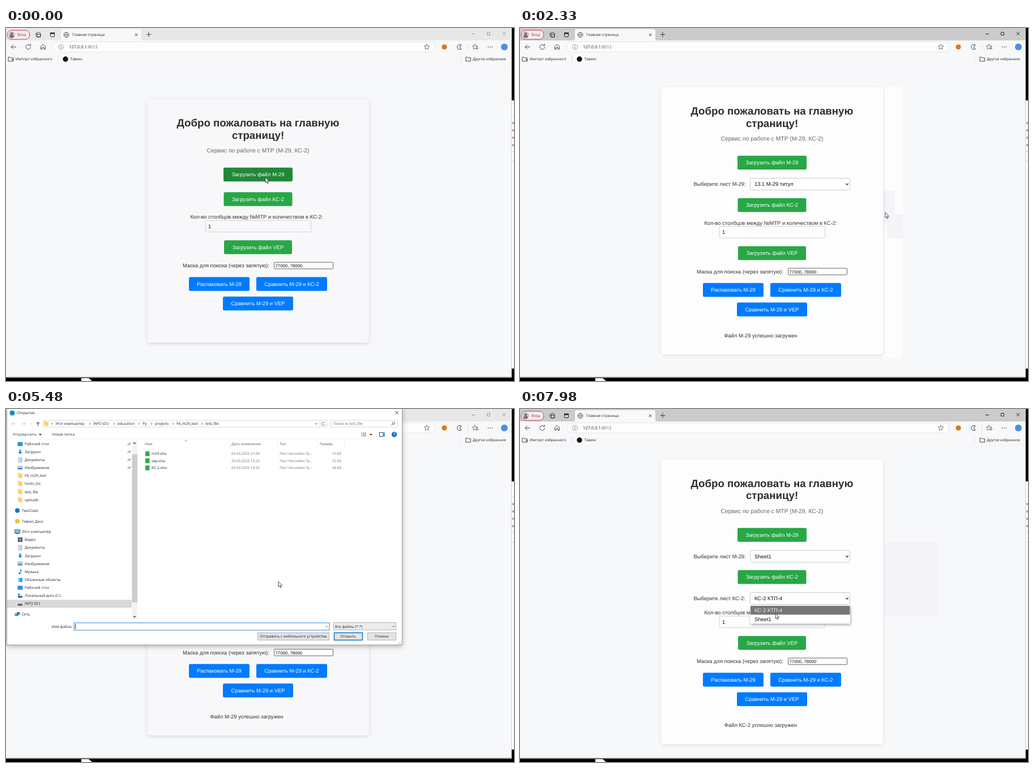
An HTML page for the animation above (8 s loop, 897 by 624 pixels).

```html
<!DOCTYPE html>
<html lang="ru">
<head>
<meta charset="utf-8">
<title>Главная страница</title>
<style>
html, body { margin: 0; width: 100%; height: 100%; overflow: hidden; background: #000; }
svg { display: block; width: 897px; height: 624px; text-rendering: geometricPrecision; font-family: "Open Sans", "Noto Sans", sans-serif; }
.web { font-family: "Liberation Sans", Arial, sans-serif; }
.lift { filter: drop-shadow(0 2px 5px rgba(0,0,0,.3)); }
.soft { filter: drop-shadow(0 2px 3px rgba(0,0,0,.13)); }
.drop { filter: drop-shadow(1px 2px 2px rgba(0,0,0,.35)); }
</style>
</head>
<body>
<svg id="stage" viewBox="0 0 897 624"></svg>
<script>
const LOOP = 8000;
const stage = document.getElementById('stage');

// --- drawing helpers -----------------------------------------------------
const text = (x, y, s, size = 6.6, fill = '#222', extra = '') =>
  `<text x="${x}" y="${y + size * .36}" font-size="${size}" fill="${fill}" ${extra}>${s}</text>`;
const rect = (x, y, w, h, fill, extra = '') =>
  `<rect x="${x}" y="${y}" width="${w}" height="${h}" fill="${fill}" ${extra}/>`;
const frame = (x, y, w, h, fill, stroke, r = 0, sw = 1) =>
  rect(x + .5, y + .5, w - 1, h - 1, fill, `stroke="${stroke}" stroke-width="${sw}" rx="${r}"`);
const dot = (x, y, r, fill, extra = '') => `<circle cx="${x}" cy="${y}" r="${r}" fill="${fill}" ${extra}/>`;
const line = (d, stroke = '#333', w = .9, fill = 'none') =>
  `<path d="${d}" stroke="${stroke}" stroke-width="${w}" fill="${fill}"/>`;
const chevron = (x, y, c = '#444', k = 2, w = .9) => line(`M${x - k} ${y - k / 2}l${k} ${k}l${k} ${-k}`, c, w);
const cross = (x, y, k, c) => line(`M${x - k} ${y - k}l${2 * k} ${2 * k}M${x + k} ${y - k}l${-2 * k} ${2 * k}`, c);
const folder = (x, y, c = '#f8d568') => rect(x - 3.5, y - 4, 4, 3, '#e3b341') + rect(x - 3.5, y - 3, 7.5, 7, c);
const folderLine = (x, y) => line(`M${x - 4} ${y - 3.5}h3l1 1.2h4.5v6h-8.5z`);
const star = (x, y) => {
  let d = '';
  for (let i = 0; i < 10; i++) {
    const r = i % 2 ? 2.2 : 5, a = i * Math.PI / 5;
    d += (i ? 'L' : 'M') + (x + r * Math.sin(a)).toFixed(2) + ' ' + (y - r * Math.cos(a)).toFixed(2);
  }
  return line(d + 'z', '#555', .8);
};
const middle = 'text-anchor="middle"';

// --- browser window ------------------------------------------------------
function desktop() {
  return rect(0, 0, 897, 624, '#000') + rect(893, 128, 4, 474, '#fafafa') +
    rect(893, 218, 4, 1, '#ccc') + rect(893, 235, 4, 1, '#ccc') + rect(893, 155, 4, 1, '#e2e2e2') +
    [168, 181, 194, 207].map(y => rect(894, y - 2, 3, 4, y === 194 ? '#d99' : '#aaa')).join('') +
    '<path d="M133 619h13l6 5h-19z" fill="#fff"/>';
}

function browser(active) {
  const ctl = active ? '#111' : '#8d8d8d';
  return rect(0, 0, 893, 618, '#f7f8fa') + rect(0, 616, 893, 1, '#dcdcdc') + rect(0, 617, 893, 1.5, '#8a8a8a') +
    rect(892, 0, 1, 617, '#d4d4d6') +
    rect(0, 0, 893, 22, active ? '#cbcbcb' : '#e8e8e8') +
    '<path d="M94 22q3 0 3-3V6q0-4 4-4h134q4 0 4 4v13q0 3 3 3z" fill="#f7f8fa"/>' +
    frame(1.5, 3.5, 41, 17, '#f6eced', '#c2414a', 8) +
    dot(10, 12, 6, '#c9c5c4') + dot(10, 10, 2.3, '#77706e') + '<path d="M6 16q0-4 4-4t4 4q-4 3-8 0z" fill="#77706e"/>' +
    text(20, 12, 'Вход', 6.6, '#b02a34') +
    line('M53 9.5l4-2.2l4 2.2v4.5l-4 2.5l-4-2.5zM55 11h6v5h-6zM53 9.5l3.5 2') +
    frame(78, 8, 8, 8, 'none', '#222', 1) + rect(78, 8, 8, 2.5, '#222') +
    dot(106.5, 12, 4.5, 'none', 'stroke="#444" stroke-width=".8"') +
    line('M102 12h9M106.5 7.5q-4 4.5 0 9q4-4.5 0-9', '#444', .7) +
    text(117, 12, 'Главная страница', 6.55) + cross(230, 12, 2.3, '#333') +
    line('M247.500 11.500h9M252 7v9', '#333') +
    line('M822 10.500h6', ctl) + frame(849, 7, 6, 6, 'none', ctl, .5, .9) + cross(879.5, 10, 2.8, ctl) +
    line('M18 33.500h-9M13 29.500l-4 4l4 4') +
    line('M43.500 33.500a4.200 4.200 0 1 1-1.500-3.200M43.500 28v3h-3') +
    line('M61.500 37.500v-5l4-3.500l4 3.500v5h-2.500v-3h-3v3z') +
    frame(82, 24, 676, 19, '#fdfdfe', '#e4e5e8', 9) +
    dot(97, 33.5, 4.3, 'none', 'stroke="#666" stroke-width=".7"') + line('M97 33v3M97 31v1', '#555') +
    text(111, 33.5, '127.0.0.1<tspan fill="#666">:8012</tspan>', 7.5) + star(743, 33.5) +
    dot(774, 33.5, 4.6, '#e2761b') +
    line('M799 29.500h4.500v2.200q-2.400.3-2.400 2t2.400 2v2h-4.500l-2-2v-4z', '#333') +
    rect(815, 28, .8, 11, '#ddd') + star(828, 33.5) + line('M831 34h3M831 36.500h3', '#444') +
    [851.5, 855, 858.5].map(x => dot(x, 33.5, .8, '#222')).join('') +
    dot(880, 33.5, 6, '#4b8fe0') +
    folderLine(8, 55) + line('M9 56h4M11.500 54l2 2l-2 2', '#333', .8) + text(17, 55, 'Импорт избранного') + rect(91, 49, .8, 11, '#ddd') +
    dot(105, 55, 4.7, '#111') + text(113.5, 55, 'Тавикс') +
    rect(802.5, 49, .8, 11, '#ddd') + folderLine(816, 55) + text(824, 55, 'Другое избранное') +
    rect(0, 65, 892, .7, '#eeeff1');
}

// --- web page ------------------------------------------------------------
const LAYOUT = [ // shift of the top block, of the second button, of the lower block
  [0, 0, 0], [-21, 10.5, 10.5], [-36.5, -5.5, 26]
];
const button = (x, y, w, label, fill) =>
  rect(x, y - 12.25, w, 24.5, fill, 'rx="2.5"') + text(x + w / 2, y, label, 9.4, '#fff', middle);
const select = (y, form, value) =>
  text(306.5, y, `Выберите лист ${form}:`, 9.4, '#333') +
  frame(406, y - 11, 177, 22, '#fdfdfe', '#c9cbce', 2) +
  text(414, y, value, 9.4, '#111') + chevron(577.5, y, '#222', 2.2, 1.3);

function page(s) {
  const [a, b, c] = LAYOUT[s.page], top = 126 + a, tint = s.white ? '#fdfdfe' : '#f8f8fa';
  const green = name => s.hot === name ? '#218838' : '#28a745';
  let out = '';
  if (s.white) out += s.page === 1
    ? rect(247, 104, 429, 478, tint) + rect(642, 288, 20, 57, '#f4f4f8') + rect(648, 329, 28, 43, '#f4f4f8')
    : rect(642, 235, 98, 130, '#f4f4f8') + rect(247, 88, 396, 510, tint);
  out += rect(249.5, top, 391.5, 430 - 2 * a, tint, 'rx="5" class="soft"');
  out += text(445, 167.5 + a, 'Добро пожаловать на главную', 18.7, '#2e2e2e', middle + ' font-weight="700"') +
    text(445, 189 + a, 'страницу!', 18.7, '#2e2e2e', middle + ' font-weight="700"') +
    text(445, 216.5 + a, 'Сервис по работе с МТР (М-29, КС-2)', 10.4, '#666', middle) +
    button(384, 259 + a, 122, 'Загрузить файл М-29', green('m')) +
    button(384.5, 302.5 + b, 121, 'Загрузить файл КС-2', green('k'));
  if (s.page > 0) out += select(297 + a, 'М-29', s.sheet);
  if (s.page > 1) out += select(335, 'КС-2', 'КС-2 КТП-4');
  out += text(442.5, 334 + c, 'Кол-во столбцов между №МТР и количеством в КС-2:', 9.4, '#333', middle) +
    frame(351.5, 339.5 + c, 187.5, 21.5, tint, '#cfd1d4', 2) + text(357, 350.5 + c, '1', 9.4, '#111') +
    button(385, 387.5 + c, 120, 'Загрузить файл VEP', '#28a745') +
    text(312, 420 + c, 'Маска для поиска (через запятую):', 9.4, '#333') +
    frame(473, 413.7 + c, 105, 12.6, '#fdfdfe', '#666', 1) + text(475.5, 420.2 + c, '77000, 78000', 7.8, '#111') +
    button(323, 452.5 + c, 107, 'Распаковать М-29', '#007bff') +
    button(442, 452.5 + c, 125, 'Сравнить М-29 и КС-2', '#007bff') +
    button(383, 487 + c, 124, 'Сравнить М-29 и VEP', '#007bff');
  if (s.page) out += text(425, 532.7 + c, `Файл ${s.page > 1 ? 'КС-2' : 'М-29'} успешно загружен`, 9.4, '#333', middle);
  if (s.menu) out += menu(s);
  return `<g class="web">${out}</g>`;
}

function menu(s) {
  const y = s.page > 1 ? 347.5 : 289;
  const items = [s.page > 1 ? 'КС-2 КТП-4' : '13.1 М-29 титул', 'Sheet1'];
  return rect(406.5, y, 176.5, 32, '#fff', 'class="drop"') + items.map((label, i) => {
    const on = i === s.menu - 1;
    return (on ? rect(407, y + .5 + i * 15.5, 175.500, 15.5, '#767676') : '') +
      text(414, y + 8.2 + i * 15.5, label, 9.4, on ? '#f2f2f2' : '#111');
  }).join('');
}

// --- file dialog ---------------------------------------------------------
const BLUE = '#2f8fd8';
const ICON = {
  desk: (x, y) => rect(x - 4.5, y - 3.5, 9, 7, BLUE),
  down: (x, y) => `<path d="M${x - 1.5} ${y - 4}h3v4h2.500l-4 4l-4-4h2.500z" fill="${BLUE}"/>`,
  doc: (x, y) => frame(x - 3.5, y - 4.5, 7, 9, '#fff', '#8a9aaa', 0, .8) + line(`M${x - 1.5} ${y - 2}h4M${x - 1.5} ${y}h4M${x - 1.5} ${y + 2}h4`, BLUE, .7),
  pic: (x, y) => frame(x - 4.5, y - 3.5, 9, 7, '#cfe6f7', '#7c93a5', 0, .8) + rect(x - 3, y, 6, 2, '#33719f'),
  dir: (x, y) => folder(x, y),
  cloud: (x, y) => dot(x, y, 4, '#1273c9'),
  disk: (x, y) => dot(x, y, 4, '#f2c230'),
  pc: (x, y) => frame(x - 5, y - 4, 10, 7, '#7cc3f0', '#3578a5') + rect(x - 3, y + 3, 6, 1, '#3578a5'),
  film: (x, y) => rect(x - 4, y - 4, 8, 8, '#444b57') + rect(x - 2.2, y - 3, 4.4, 6, '#6f8fc0'),
  note: (x, y) => dot(x - 1, y + 2.5, 1.8, BLUE) + line(`M${x + .5} ${y + 2.5}v-7q0 2 3 3`, BLUE, 1.2),
  cube: (x, y) => rect(x - 4, y - 3.5, 8, 7.500, '#35a6d8') + rect(x - 4, y - 3.5, 3, 7.5, '#8ad6f2'),
  drive: (x, y) => rect(x - 4, y + .5, 8, 3, '#4a4f55') + rect(x + 2, y + 1.5, 1, 1, '#6d6'),
  win: (x, y) => ICON.drive(x, y) + rect(x - 4, y - 3.5, 4, 3, BLUE),
  net: (x, y) => rect(x - 4.5, y - 1.5, 6, 4.5, '#4e93bd') + rect(x - 1, y - 4, 5.5, 5, '#3a7fae')
};
const TREE = [ // centre line, icon, label
  [62, 'desk', 'Рабочий стол'], [76, 'down', 'Загрузки'], [90, 'doc', 'Документы'], [104, 'pic', 'Изображения'],
  [118, 'dir', 'FA_m29_test'], [132, 'dir', 'hosts_list'], [146.3, 'dir', 'test_file'], [160.5, 'dir', 'uploads'],
  [179.5, 'cloud', 'TwoCrate', 1], [198.5, 'disk', 'Тавикс.Диск', 1], [217, 'pc', 'Этот компьютер', 1],
  [231, 'film', 'Видео'], [245, 'doc', 'Документы'], [259.5, 'down', 'Загрузки'], [273.5, 'pic', 'Изображения'],
  [288, 'note', 'Музыка'], [302, 'cube', 'Объемные объекты'], [316, 'desk', 'Рабочий стол'],
  [330, 'win', 'Локальный диск (C:)'], [344, 'drive', 'INFO (D:)'], [363, 'net', 'Сеть', 1]
];
const CRUMBS = [[87, 'Этот компьютер'], [154, 'INFO (D:)'], [197, 'education'], [241, 'Py'], [263, 'projects'], [301, 'FA_m29_test'], [352, 'test_file']];
const FILES = [
  ['m29.xlsx', '04.03.2025 21:08', '15 КБ'],
  ['vep.xlsx', '20.05.2023 13:23', '10 КБ'],
  ['КС-2.xlsx', '09.03.2025 14:32', '24 КБ']
];
const pin = y => line(`M214.500 ${y + 2.500}l2-2M215.500 ${y - 1.500}l3 3M216.500 ${y - .5}l2-2l1.500 1.500l-2 2`, '#777', 1);

function dialog(s) {
  let o = rect(1.5, -1, 698, 418, '#fff', 'class="lift" stroke="#8b8b8b" stroke-width=".8"');
  o += dot(11, 7, 4.5, '#1b87c9') + text(19, 7, 'Открытие') + cross(690, 6.5, 2.8, '#222');
  o += line('M17 26h-7M13 23l-3 3l3 3M27 26h7M31 23l3 3l-3 3', '#c4c4c4') + chevron(44, 26, '#bbb', 1.3) +
    line('M56.500 30v-7M53.500 26l3-3l3 3', '#333', 1);
  o += frame(65, 19.5, 502, 13, '#fff', '#d9d9d9') + folder(71, 26) + rect(554, 20, .8, 12, '#ddd');
  for (const [x, name] of CRUMBS) o += line(`M${x - 7} 24l2 2l-2 2`, '#555', .8) + text(x, 26, name, 6.5);
  o += chevron(548, 26) + line('M562.500 26.500a2.600 2.600 0 1 1-1-2.200v-1.500', '#444', .8);
  o += frame(573, 19.5, 119, 13, '#fff', '#d9d9d9') + text(578, 26, 'Поиск в: test_file', 6.5, '#666') +
    dot(684.5, 25, 2, 'none', 'stroke="#333" stroke-width=".8"') + line('M683 26.500l-2.500 2.500');
  o += text(12, 45, 'Упорядочить', 6.5, '#1e395b') + '<path d="M58 44h5l-2.500 3z" fill="#1e395b"/>' +
    text(81, 45, 'Новая папка', 6.5, '#1e395b') +
    line('M627 42.500h2M627 45h2M627 47.500h2M630 42.500h6M630 45h6M630 47.500h6', '#667', 1) +
    '<path d="M642 44h5l-2.500 3z" fill="#333"/>' +
    frame(659, 41, 10, 8, '#fff', '#345') + rect(665, 41, 4, 8, '#5aa0d8') +
    dot(685.5, 45, 4.7, '#0d72c4') + text(685.5, 45, '?', 6.6, '#fff', middle + ' font-weight="700"') +
    rect(2, 53.5, 697, .7, '#efefef');

  o += rect(2, 337.3, 220, 14, '#d9d9d9');
  for (const [y, icon, name, root] of TREE) o += ICON[icon](root ? 20 : 25, y) + text(root ? 28 : 33, y, name, 6.5);
  o += [62, 76, 90, 104].map(pin).join('');
  o += rect(222.5, 56, 9.5, 316, '#f3f3f3') + rect(222.5, 80, 9.5, 262, '#cdcdcd') +
    line('M225 61.500l2-2l2 2', '#333', 1.1) + chevron(227, 367, '#333', 2, 1.1);

  const heads = [[245, 'Имя'], [398, 'Дата изменения'], [483, 'Тип'], [554, 'Размер']];
  o += heads.map(([x, h]) => text(x, 62, h, 6.5, '#4c607a')).join('') +
    [394, 478.5, 549.5, 597].map(x => rect(x, 55, .7, 14, '#e5e5e5')).join('') + line('M316 57l2-1.700l2 1.700', '#666', .7);
  FILES.forEach(([name, date, size], i) => {
    const y = 79 + i * 12.5;
    if (s.pick === i || s.over === i) o += rect(243.5, y - 6.2, 350, 12.4, s.pick === i ? '#cce8ff' : '#e5f3ff');
    o += rect(246, y - 4.2, 7.5, 8.5, '#35a853') + text(257, y, name, 6.5) + text(398, y, date, 6.3, '#6d6d6d') +
      text(483, y, 'Лист Norvellon Ta...', 6.3, '#6d6d6d') + text(592, y, size, 6.3, '#6d6d6d', 'text-anchor="end"');
  });

  o += text(117, 384.3, 'Имя файла:', 6.5, '#222', 'text-anchor="end"') + frame(119.5, 377.5, 452, 14, '#fff', '#2b88d8') + chevron(566, 384.5) +
    (s.pick === undefined ? rect(122, 380, .9, 9, '#111') : text(123, 384.3, FILES[s.pick][0], 6.5)) +
    frame(578, 377, 111, 14, '#ececec', '#b4b4b4') + text(581, 384.3, 'Все файлы (*.*)', 6.5) + chevron(684, 384.5) +
    frame(444, 395, 127, 14, '#e3e3e3', '#b4b4b4') + text(507.5, 402, 'Отправить с мобильного устройства', 6.6, '#222', middle) +
    frame(579, 395, 51, 14, '#e3e3e3', '#0078d7', 0, 1.5) + text(604, 402, 'Открыть', 6.6, '#222', middle) +
    frame(638, 395, 51, 14, '#e3e3e3', '#b4b4b4') + text(663, 402, 'Отмена', 6.6, '#222', middle) +
    line('M692 416l6-6M695 416l3-3', '#aaa', .8);
  return `<g opacity="${s.fade}" transform="translate(350 208) scale(${s.zoom}) translate(-350 -208)">${o}</g>`;
}

const pointer = ([x, y]) =>
  `<path transform="translate(${x.toFixed(1)} ${y.toFixed(1)})" d="M0 0v9.300l2.100-1.900l1.500 3.500l1.500-.7l-1.500-3.300h2.900z" fill="#fff" stroke="#222" stroke-width=".8"/>`;

// --- timeline ------------------------------------------------------------
const TICKS = [0, 160, 290, 420, 570, 700, 830, 950, 1080, 1230, 1380, 1530, 1660, 1830, 2000, 2180,
  2330, 2460, 2590, 2720, 2850, 2990, 3120, 3250, 3400, 3550, 3670, 3800, 4100, 4240, 4370, 4510, 4650, 4780, 4920,
  5330, 5480, 5620, 5750, 5880, 6020, 6320, 6470, 6620, 6750, 6890, 7030, 7180, 7320, 7440, 7580, 7710, 7840, 7980];
const PATH = [[0, 458, 264], [420, 460, 262], [570, 460, 262], [1080, 274, 83], [1530, 274, 83], [2180, 652, 334],
  [2330, 645, 326], [2590, 492, 308], [2720, 500, 284], [2850, 500, 284], [3250, 418, 315], [3400, 417, 316], [4100, 417, 316],
  [4650, 481, 305], [5480, 481, 305], [6020, 281, 105], [6620, 281, 105], [7320, 468, 336], [7440, 468, 336], [7980, 451, 361]];
const STATES = [
  [0, { page: 0, hot: 'm', active: 0, fade: 0, zoom: 1, sheet: '13.1 М-29 титул' }],
  [160, { fade: .6, zoom: .975 }],
  [290, { fade: 1, zoom: 1 }],
  [950, { over: 0 }],
  [1080, { pick: 0 }],
  [1380, { active: 1, fade: .7, zoom: .985 }],
  [1530, { fade: .18, zoom: .966 }],
  [1660, { fade: 0, hot: '', pick: undefined, over: undefined }],
  [1830, { page: 1, white: 1 }],
  [2590, { hot: 'k' }],
  [2850, { menu: 1 }],
  [3120, { menu: 2 }],
  [3550, { menu: 0, sheet: 'Sheet1' }],
  [4780, { active: 0, white: 0 }],
  [5330, { fade: .6, zoom: .975 }],
  [5480, { fade: 1, zoom: 1 }],
  [5880, { over: 2 }],
  [6020, { pick: 2 }],
  [6470, { active: 1, fade: .7, zoom: .985 }],
  [6620, { fade: .16, zoom: .966 }],
  [6750, { fade: 0, hot: '' }],
  [7030, { page: 2, white: 1 }],
  [7440, { menu: 1 }]
];

function cursorAt(t) {
  const i = PATH.findIndex(p => p[0] > t);
  if (i < 0) return PATH[PATH.length - 1].slice(1);
  const [t0, x0, y0] = PATH[i - 1], [t1, x1, y1] = PATH[i];
  const k = (t - t0) / (t1 - t0), e = k * k * (3 - 2 * k);
  return [x0 + (x1 - x0) * e, y0 + (y1 - y0) * e];
}

function draw(t) {
  const s = Object.assign({}, ...STATES.filter(k => k[0] <= t).map(k => k[1]));
  stage.innerHTML = desktop() + browser(s.active) + page(s) + (s.fade ? dialog(s) : '') + pointer(cursorAt(t));
}

let shown = -1;
const start = performance.now();
function tick() {
  const t = (performance.now() - start) % LOOP;
  const step = TICKS.filter(v => v <= t).pop();
  if (step !== shown) draw(shown = step);
  requestAnimationFrame(tick);
}
tick();
</script>
</body>
</html>
```
